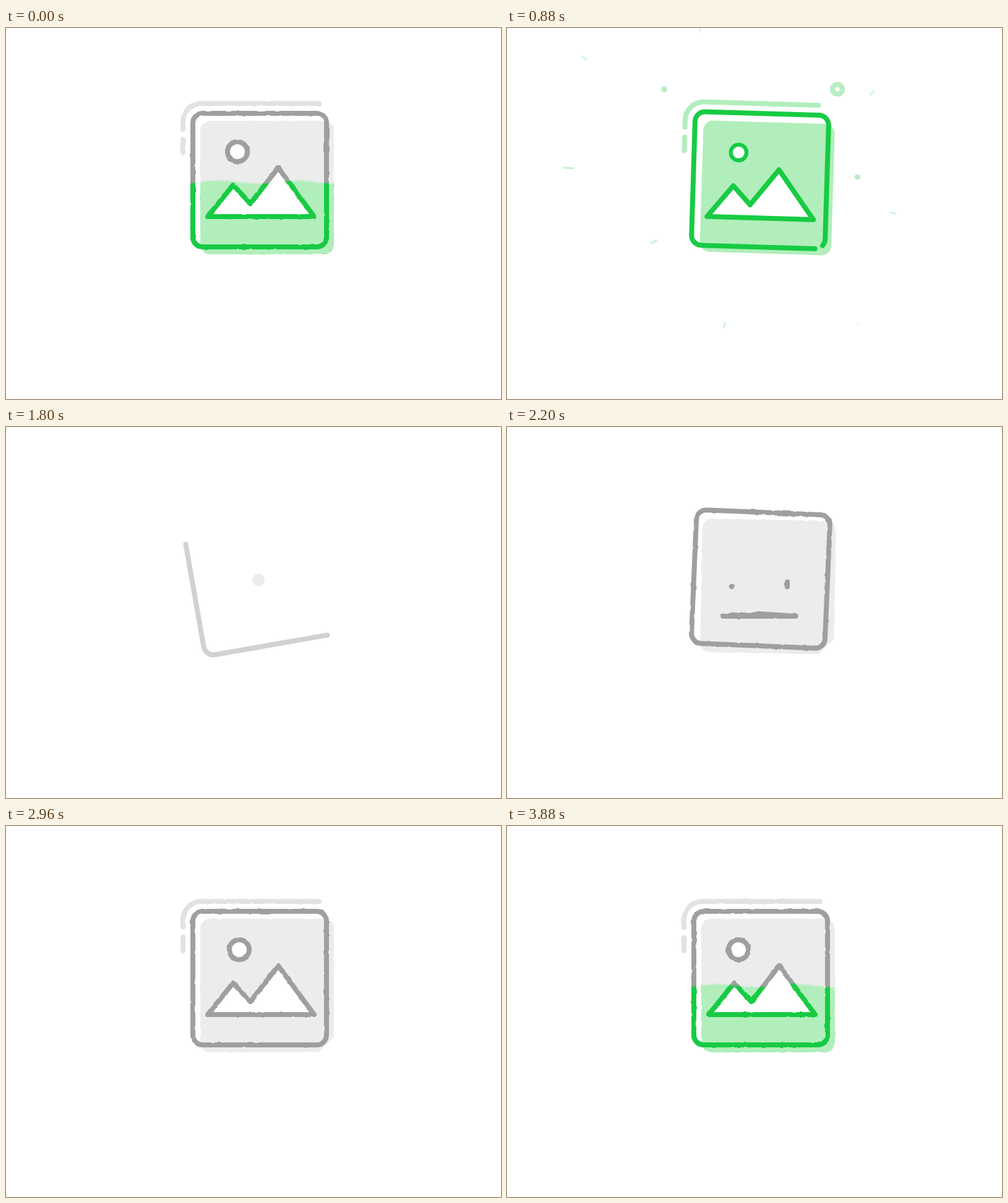
An HTML page that plays this animation: 800 px wide and 600 px high, repeating every 3.92 s.

```html
<!DOCTYPE html>
<html lang="en">
<head>
<meta charset="utf-8">
<title>Image loader</title>
<style>
html, body { margin: 0; width: 100%; height: 100%; overflow: hidden; background: #fff; }
svg { display: block; width: 800px; height: 600px; }
</style>
</head>
<body>
<svg id="stage" viewBox="0 0 800 600"></svg>
<script>
const LOOP = 3920, CX = 410, CY = 246;
const stage = document.getElementById('stage');

const clamp = (v, a = 0, b = 1) => Math.min(b, Math.max(a, v));
const span = (t, a, b) => clamp((t - a) / (b - a));
const mix = (a, b, p) => a + (b - a) * p;
const outQuad = p => 1 - (1 - p) ** 2;
const inOutQuad = p => p < .5 ? 2 * p * p : 1 - 2 * (1 - p) ** 2;
const inOutCubic = p => p < .5 ? 4 * p ** 3 : 1 - 4 * (1 - p) ** 3;
const smooth = p => p * p * (3 - 2 * p);

// Interpolates between [time, value] pairs.
function keys(t, list, ease = p => p) {
  if (t <= list[0][0]) return list[0][1];
  for (let i = 1; i < list.length; i++) {
    const [a, va] = list[i - 1], [b, vb] = list[i];
    if (t < b) return mix(va, vb, ease((t - a) / (b - a)));
  }
  return list[list.length - 1][1];
}

// One colour version of the picture icon.
const art = (id, strong, light, tab) => `
  <g id="${id}" fill="none" stroke="${strong}" stroke-width="8" stroke-linecap="round" stroke-linejoin="round">
    <g data-k="root">
      <g stroke="${tab}">
        <path data-k="tab" pathLength="1" d="M-124-82V-94A30 30 0 0 1-94-124H96"/>
        <path data-k="dash" d="M-124-66V-44"/>
      </g>
      <path data-k="shadow" fill="${light}" stroke="none"/>
      <g clip-path="url(#floor)">
        <path data-k="hills" fill="#fff"/>
        <circle data-k="sun" fill="#fff"/>
      </g>
      <path data-k="eye"/>
      <path data-k="frame" pathLength="1" d="M92 108H-92A16 16 0 0 1-108 92V-92A16 16 0 0 1-92-108H92A16 16 0 0 1 108-92V92A16 16 0 0 1 92 108Z"/>
    </g>
  </g>`;

stage.innerHTML = `
  <defs>
    <clipPath id="floor"><rect x="-150" y="-150" width="300" height="258"/></clipPath>
    <filter id="soft" filterUnits="userSpaceOnUse" x="0" y="0" width="800" height="600">
      <feGaussianBlur stdDeviation="1.2"/>
    </filter>
    <filter id="blur" filterUnits="userSpaceOnUse" x="380" y="100" width="60" height="80">
      <feGaussianBlur stdDeviation="2"/>
    </filter>
    <filter id="rough" filterUnits="userSpaceOnUse" x="260" y="90" width="300" height="310" color-interpolation-filters="sRGB">
      <feTurbulence id="noise" type="fractalNoise" baseFrequency=".1" numOctaves="1" result="n"/>
      <feDisplacementMap in="SourceGraphic" in2="n" scale="3" xChannelSelector="R" yChannelSelector="G"/>
    </filter>
    <mask id="fill" maskUnits="userSpaceOnUse" x="0" y="0" width="800" height="600">
      <path id="wave" fill="#fff" filter="url(#soft)"/>
    </mask>
  </defs>
  <g id="sparks" fill="none" stroke-linecap="round"></g>
  <g id="icon">
    ${art('grey', '#9f9f9f', '#ececec', '#e2e2e2')}
    <g mask="url(#fill)">${art('green', '#17cb43', '#b1eebb', '#b1eebb')}</g>
  </g>
  <rect id="drop" x="401" width="11" height="11" rx="3" fill="#17cb43" filter="url(#blur)"/>`;

const $ = id => document.getElementById(id);
const parts = id => Object.fromEntries(
  [...$(id).querySelectorAll('[data-k]')].map(e => [e.dataset.k, e]));
const layers = [parts('grey'), parts('green')];

function set(el, attrs) {
  for (const k in attrs) el.setAttribute(k, attrs[k]);
}
const show = (el, on) => el.setAttribute('display', on ? 'inline' : 'none');

function trim(el, f) {
  show(el, f > .004);
  set(el, { 'stroke-dasharray': f >= .999 ? 'none' : `${f} 2` });
}

// Rounded square; the cut version has a bevelled lower right corner.
function square(h, r, cut) {
  const c = cut ? 25 * h / 108 : r;
  const a = `A${r} ${r} 0 0 1 `;
  const corner = cut ? `L${h - c} ${h}` : `${a}${h - c} ${h}`;
  return `M${r - h} ${-h}H${h - r}${a}${h} ${r - h}V${h - c}${corner}H${r - h}${a}${-h} ${h - r}V${r - h}${a}${r - h} ${-h}Z`;
}

const mouth = [[-60, 60], [-32, 60], [-18, 60], [-4, 60], [55, 60]];
const peaks = [[-84, 59], [-43, 8], [-15, 38], [30, -20], [88, 59]];

function drawIcon(t) {
  const leaving = t < 1400;
  const p = leaving ? span(t, 830, 1230) : 0;
  const e = p * p, turn = p ** 1.33;
  const spin = leaving ? 0 : keys(t, [[1630, -21], [1720, -16], [1800, -10], [1980, 0], [2140, 2.6], [2200, 2.46], [2400, 0]]);
  const grow = leaving ? 1 - e : inOutQuad(span(t, 1630, 1990));
  const alpha = leaving ? 1 : span(t, 1630, 1990);
  const tabs = leaving ? clamp(1 - e * 1.39) : inOutQuad(span(t, 2440, 2760));
  const dash = leaving ? e < .75 : t > 2440;

  // Backing square
  const size = leaving ? 1 - span(t, 840, 1160) ** 2
    : keys(t, [[1730, 0], [1800, .093], [1900, .55], [2030, 1.11], [2180, 1]], smooth);
  const half = 108 * size;
  const r = leaving ? 16 * size : Math.min(16, half);
  const home = leaving ? 1 : span(t, 1800, 2030);

  // Mouth opening into mountains
  const m = leaving ? 1 : inOutCubic(span(t, 2080, 2600));
  const wide = leaving ? 1 : outQuad(span(t, 1900, 2050));
  const slide = 135 * e;
  const hills = 'M' + mouth.map(([x, y], i) =>
    `${mix(x * wide, peaks[i][0], m)} ${mix(y, peaks[i][1], m) + slide}`).join('L') + 'Z';

  // Left eye turning into the sun
  const s = leaving ? 1 : inOutCubic(span(t, 2220, 2620));
  const shrink = leaving ? 1 - span(t, 790, 990) ** 2 : 1;
  const drift = leaving ? 0 : 3 * (1 - smooth(span(t, 2960, 3300)));
  const ring = mix(2, 16, s);
  const pop = leaving ? 1 : span(t, 1940, 2020);
  const eye = keys(t, [[1940, 0], [2050, 16], [2120, 16], [2200, 8], [2270, 0]]);

  layers.forEach((o, i) => {
    set(o.root, { transform: `translate(${CX - 15 * turn} ${CY + 3.7 * turn}) rotate(${27 * turn})` });
    trim(o.frame, grow);
    set(o.frame, { transform: `rotate(${spin})`, opacity: alpha });
    trim(o.tab, tabs);
    show(o.dash, dash);
    show(o.shadow, size > .005);
    set(o.shadow, {
      d: square(half, r, i === 0 && half > 50),
      transform: `translate(${mix(-2, 12, home)} ${mix(1, 12, home)}) rotate(${spin * .45})`
    });
    show(o.hills, leaving ? p < 1 : t > 1900);
    set(o.hills, { d: hills });
    show(o.sun, shrink > .01 && pop > 0);
    set(o.sun, {
      cx: mix(-47, -36 + drift, s), cy: mix(12, -46, s) + slide,
      r: ring * shrink * pop, 'stroke-width': mix(4.6, 8, s) * shrink * pop
    });
    show(o.eye, !leaving && eye > 0 && t < 2270);
    set(o.eye, { d: `M43 ${8.5 - eye / 2}V${8.5 + eye / 2}`, 'stroke-width': Math.min(8, eye * 2) });
  });

  show($('grey'), t < 600 || t > 1400);
  const textured = t < 620 || t > 2050;
  set($('icon'), { filter: textured ? 'url(#rough)' : 'none' });
  if (textured) set($('noise'), { seed: 1 + Math.floor(t / 240) });
}

function drawWave(t) {
  const u = t < 1400 ? t + LOOP : t;
  const level = keys(u, [[3140, 390], [3200, 371], [3360, 342], [3880, 258.5], [3920, 249.5], [4480, 124.5], [4520, 110], [4560, -20]]);
  let d = 'M0 600';
  for (let x = 0; x <= 800; x += 5) {
    const y = level - 2.5 * Math.cos((x - 345 - .119 * (u - LOOP)) * Math.PI * 2 / 125);
    d += `L${x} ${y.toFixed(2)}`;
  }
  set($('wave'), { d: d + 'L800 600Z' });
}

// angle, reach, start, life, length
const streaks = [
  [183.6, 392, 520, 660, 14], [150, 243, 530, 610, 9], [214.7, 412, 520, 600, 7], [55.7, 330, 520, 590, 3],
  [-81, 300, 480, 300, 6], [14, 236, 540, 460, 9], [-38, 235, 530, 420, 9], [104, 255, 550, 430, 8], [248, 270, 540, 400, 8]
];

const hoop = (x, y, R, t, start) => {
  const p = (t - start) / 575;
  if (p <= 0 || p >= 1) return '';
  const outer = R * outQuad(clamp(p * 2)), inner = R * clamp(p * 2 - 1);
  return `<circle cx="${x}" cy="${y}" r="${(outer + inner) / 2}" stroke="#b9edc4" stroke-width="${outer - inner}"/>`;
};

function drawSparks(t) {
  let out = '';
  for (const [deg, reach, start, life, len] of streaks) {
    const p = (t - start) / life;
    if (p <= 0 || p >= 1) continue;
    const a = deg * Math.PI / 180, d = reach * outQuad(p), l = len / 2;
    const at = q => `${CX + Math.cos(a) * q} ${CY + Math.sin(a) * q}`;
    out += `<path d="M${at(d - l)}L${at(d + l)}" stroke="#b1eebb" stroke-width="${Math.min(3.2, len / 2.5)}" opacity="${clamp(1.3 - p)}"/>`;
  }
  out += hoop(534, 99, 12, t, 507) + hoop(254, 99, 10, t, 800);
  const q = (t - 880) / 230;
  if (q > 0 && q < 1) {
    for (let i = 0; i < 4; i++) {
      const a = (39 + 90 * i) * Math.PI / 180, d = 38.4 * outQuad(q);
      out += `<circle cx="${566.5 + d * Math.cos(a)}" cy="${241 + d * Math.sin(a)}" r="${4 * Math.min(1, (1 - q) * 8)}" fill="#b9edc4"/>`;
    }
  }
  $('sparks').innerHTML = out;
  show($('drop'), t > 520 && t < 610);
  set($('drop'), { y: 138 - (t - 560) * .2, opacity: .65 });
}

function render(t) {
  drawIcon(t);
  drawWave(t);
  drawSparks(t);
}

const begin = performance.now();
function tick() {
  render((performance.now() - begin) % LOOP);
  requestAnimationFrame(tick);
}
render(0);
requestAnimationFrame(tick);
</script>
</body>
</html>
```
